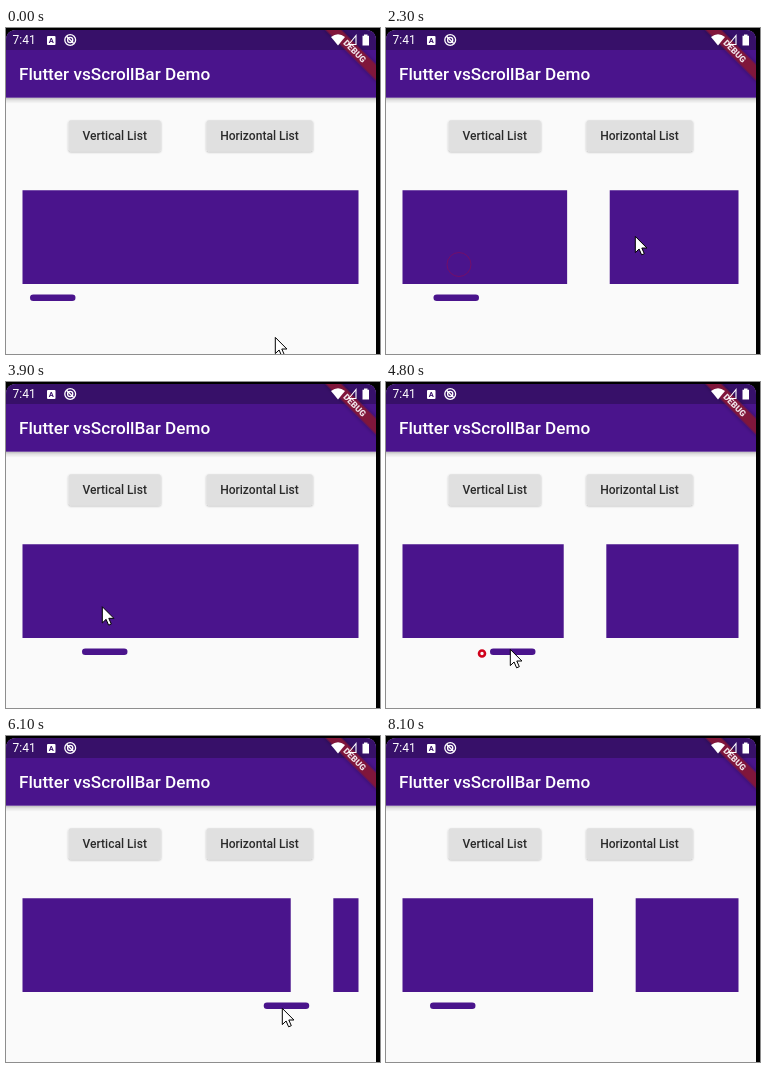
Animation of 374x326 px, one loop 9500 ms. Source, as an HTML page:

```html
<!DOCTYPE html>
<html lang="en">
<head>
<meta charset="utf-8">
<title>Scroll bar demo</title>
<style>
  html, body { margin: 0; width: 100%; height: 100%; overflow: hidden; background: #000; }
  svg { display: block; width: 374px; height: 326px; font-family: Roboto, sans-serif; }
  .medium { font-weight: 500; }
</style>
</head>
<body>
<svg viewBox="0 0 374 326">
  <defs>
    <clipPath id="screen"><path d="M0 326V13Q0 2 11 2H359Q370 2 370 13V326Z"/></clipPath>
    <clipPath id="viewport"><rect x="16.5" y="162.3" width="336" height="93.7"/></clipPath>
    <linearGradient id="fade" x2="0" y2="1">
      <stop offset="0" stop-opacity=".26"/>
      <stop offset=".4" stop-opacity=".1"/>
      <stop offset="1" stop-opacity="0"/>
    </linearGradient>
    <filter id="lift" x="-10%" y="-20%" width="120%" height="150%">
      <feDropShadow dx="0" dy="1" stdDeviation=".8" flood-opacity=".28"/>
    </filter>
    <filter id="soft" x="-20%" y="-60%" width="140%" height="220%">
      <feDropShadow dx="0" dy="0" stdDeviation="2" flood-opacity=".4"/>
    </filter>
  </defs>

  <g clip-path="url(#screen)">
    <rect width="370" height="326" fill="#fafafa"/>
    <rect y="69.7" width="370" height="6" fill="url(#fade)"/>
    <rect width="370" height="69.7" fill="#4a148c"/>
    <rect width="370" height="22" fill="#371069"/>
    <text class="medium" x="13" y="51.9" font-size="17.2" fill="#fff">Flutter vsScrollBar Demo</text>

    <g transform="translate(370 2) rotate(45)">
      <rect x="-37" y="24.5" width="74" height="11" fill="#80143a" filter="url(#soft)"/>
      <text y="33.1" font-size="8.7" font-weight="900" fill="#f0e4ea" text-anchor="middle">DEBUG</text>
    </g>

    <g fill="#fff">
      <text x="6.5" y="16.3" font-size="12">7:41</text>
      <rect x="41" y="8" width="8.5" height="9" rx="1"/>
      <text x="45.25" y="15.2" font-size="7.5" font-weight="700" text-anchor="middle" fill="#371069">A</text>
      <g fill="none" stroke="#fff" stroke-width="1.3">
        <circle cx="64.2" cy="12" r="5.4"/>
        <circle cx="64.2" cy="12" r="2.6"/>
        <path d="M60.7 8.5L67.7 15.5"/>
      </g>
      <path d="M325 9Q332 3.5 339 9L332 17.5Z"/>
      <path d="M342.8 16.5L350 7.5V16.5Z" fill="none" stroke="#fff" stroke-width="1.1"/>
      <path d="M358 6.5H361.5V7.7H363V17.5H356.5V7.7H358Z"/>
    </g>

    <g fill="#e0e0e0" filter="url(#lift)">
      <rect x="62.6" y="92.3" width="92.2" height="31" rx="2"/>
      <rect x="200.5" y="92.3" width="106.2" height="31" rx="2"/>
    </g>
    <g class="medium" font-size="12.05" fill="#2a2a2a" text-anchor="middle">
      <text x="108.7" y="112.1">Vertical List</text>
      <text x="253.5" y="112.1">Horizontal List</text>
    </g>

    <g clip-path="url(#viewport)"><g id="list" fill="#4a148c"></g></g>
    <rect id="thumb" y="266.4" width="45.5" height="6.6" rx="3.3" fill="#4a148c"/>
  </g>

  <circle id="ripple" stroke="#d0021b"/>
  <path id="cursor" d="M0 0V16.2L3.8 12.6L6.3 18.4L9 17.3L6.5 11.6H11.6Z"
        fill="#fff" stroke="#000" stroke-linejoin="round"/>
</svg>

<script>
const LOOP = 9500, STEP = 100;
const LEFT = 16.5, VIEW = 336, THUMB = 45;
const COUNT = 6, PITCH = 416, GAP = 42.6;
const RATIO = (COUNT * PITCH - VIEW) / (VIEW - THUMB);

// The pointer glides between a few stops.
const home = { x: 269, y: 309 };
const glides = [
  { from: 0, to: 500, x: 193, y: 221 },
  { from: 600, to: 900, x: 70, y: 263 },
  { from: 900, to: 1500, x: 73, y: 236 },
  { from: 1700, to: 1900, x: 249, y: 208 },
  { from: 2800, to: 3000, x: 96, y: 208 },
  { from: 3600, to: 4500, x: 96, y: 271 },
  { from: 4600, to: 4700, x: 124, y: 267 },
  { from: 4800, to: 5400, x: 307, y: 271 },
  { from: 5700, to: 6050, x: 276, y: 272 },
  { from: 6135, to: 7270, x: 64, y: 291 },
  { from: 7700, to: 8100, x: 50, y: 326 }
];
// Flicking the list lets the thumb coast to x.
const flings = [
  { from: 600, to: 1500, x: 103.9 },
  { from: 1700, to: 2500, x: 46.6 },
  { from: 2800, to: 3400, x: 76 }
];
// Finally the thumb itself is held and trails the pointer.
const grab = { from: 4500, to: 7300, offset: 20, lag: 100 };

const get = id => document.getElementById(id);
const set = (el, attrs) => {
  for (const key in attrs) el.setAttribute(key, attrs[key]);
};
const clamp = (v, lo, hi) => Math.min(Math.max(v, lo), hi);
const mix = (a, b, p) => a + (b - a) * p;
const part = (move, t) => clamp((t - move.from) / (move.to - move.from), 0, 1);
const smooth = p => p * p * (3 - 2 * p);
const coast = p => 1 - (1 - p) ** 3;

function cursorAt(t) {
  return glides.reduce((pos, glide) => {
    const p = smooth(part(glide, t));
    return { x: mix(pos.x, glide.x, p), y: mix(pos.y, glide.y, p) };
  }, home);
}

function thumbAt(t) {
  if (t >= grab.from) {
    return cursorAt(clamp(t - grab.lag, grab.from, grab.to)).x - grab.offset;
  }
  return flings.reduce((x, fling) => mix(x, fling.x, coast(part(fling, t))), 24);
}

const list = get("list");
for (let i = 0; i < COUNT; i++) {
  const item = document.createElementNS("http://www.w3.org/2000/svg", "rect");
  set(item, { x: LEFT + GAP / 2 + i * PITCH, y: 162, width: PITCH - GAP, height: 95 });
  list.append(item);
}

// A press shows a dot that opens into a fading ring.
function drawRipple(t) {
  const press = [...flings, grab].find(({ from }) => t > from && t < from + 700);
  const ripple = get("ripple");
  ripple.style.display = press ? "" : "none";
  if (!press) return;
  const { x, y } = cursorAt(press.from);
  const age = t - press.from, grow = Math.max(0, age - 300) / 300;
  const dot = age <= 200;
  set(ripple, {
    cx: x, cy: y + 0.5,
    r: dot ? 2.7 : mix(3, 12, grow),
    fill: dot ? "#d0021b" : "none",
    "stroke-width": dot ? 1 : mix(2.6, 1, grow),
    opacity: mix(1, 0.3, grow)
  });
}

function draw(t) {
  const x = thumbAt(t), tip = cursorAt(t), cursor = get("cursor");
  set(get("thumb"), { x });
  set(list, { transform: `translate(${(LEFT - x) * RATIO} 0)` });
  drawRipple(t);
  cursor.style.display = t < 8100 ? "" : "none";
  set(cursor, { transform: `translate(${tip.x + 0.3} ${tip.y + 0.4})` });
}

const start = performance.now();
function tick() {
  const t = (performance.now() - start) % LOOP;
  draw(Math.floor(t / STEP) * STEP);
  requestAnimationFrame(tick);
}
tick();
</script>
</body>
</html>
```
